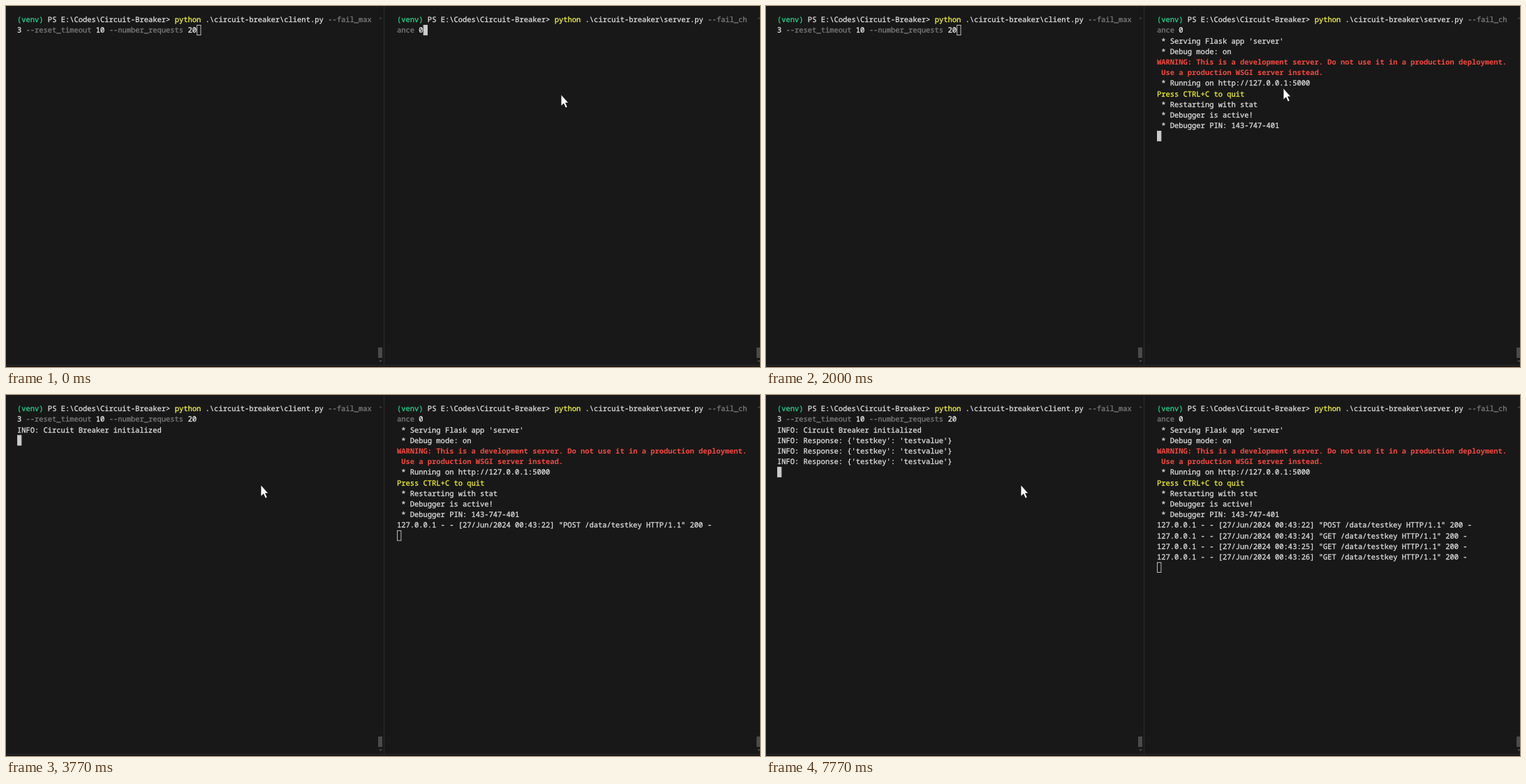
Write an HTML page that moves like this. It is 1080 px wide and 518 px high and loops after 8000 ms.

```html
<!DOCTYPE html>
<html lang="en">
<head>
<meta charset="utf-8">
<title>Circuit breaker terminals</title>
<style>
  html, body { margin: 0; width: 100%; height: 100%; overflow: hidden; background: #181818; }
  svg { display: block; width: 100vw; height: 100vh; }
  text {
    font: 10.45px "Noto Sans Mono", "DejaVu Sans Mono", monospace;
    font-variant-ligatures: none;
    text-rendering: geometricPrecision;
    white-space: pre;
    color: #dedede;
    fill: currentColor;
    stroke: currentColor;
    stroke-width: 0.3;
  }
  tspan { fill: currentColor; stroke: currentColor; }
  .env { color: #23d18b; }
  .cmd { color: #f5f543; font-weight: 500; }
  .opt { color: #7b7b7b; }
  .num { color: #eeeeee; font-weight: 500; }
  .warn { color: #f4483f; font-weight: 700; stroke: none; }
  .note { color: #f0f02c; }
  .edge { fill: #2b2b2b; }
  .thumb { fill: #4a4a4a; }
  .arrow { fill: #505050; }
</style>
</head>
<body>
<svg id="stage" viewBox="0 0 1080 518" preserveAspectRatio="none">
  <rect width="1080" height="518" fill="#181818"/>
  <rect class="edge" x="541" width="1" height="515"/>
  <rect class="edge" y="515" width="1080" height="1"/>
</svg>
<script>
const LOOP = 8000;
const CELL = 6.27, ROW = 15.2, TOP = 11.8, BASE = 11.3;
const LEFT = 16, RIGHT = 560;
const stage = document.getElementById('stage');

function add(tag, attrs, parent = stage) {
  const el = document.createElementNS('http://www.w3.org/2000/svg', tag);
  for (const key in attrs) el.setAttribute(key, attrs[key]);
  parent.appendChild(el);
  return el;
}

// Scroll bars
for (const x of [533, 1075]) {
  add('rect', { class: 'thumb', x, y: 490, width: 6, height: 15 });
  add('path', { class: 'arrow', d: `M${x + 1} 508.5h5l-2.5 2.5z` });
  add('path', { class: 'arrow', d: `M${x + 1} 18.5h5l-2.5-2.5z`, opacity: 0.7 });
}

// A line is a list of [text, class] runs set on the character grid.
const lines = [];
function line(x, row, from, ...runs) {
  const el = add('text', { y: TOP + row * ROW + BASE });
  let col = 0;
  for (const [str, cls = ''] of runs) {
    add('tspan', { x: x + col * CELL, class: cls }, el).textContent = str;
    col += str.length;
  }
  lines.push({ el, from });
}

function prompt(x, script, option) {
  line(x, 0, 0, ['(venv)', 'env'], [' PS E:\\Codes\\Circuit-Breaker> '],
    ['python', 'cmd'], [` .\\circuit-breaker\\${script} `], [option, 'opt']);
}

prompt(LEFT, 'client.py', '--fail_max');
line(LEFT, 1, 0, ['3', 'num'], [' --reset_timeout ', 'opt'], ['10', 'num'],
  [' --number_requests ', 'opt'], ['20', 'num']);
line(LEFT, 2, 3770, ['INFO: Circuit Breaker initialized']);

prompt(RIGHT, 'server.py', '--fail_ch');
line(RIGHT, 1, 0, ['ance ', 'opt'], ['0', 'num']);
[
  [" * Serving Flask app 'server'"],
  [' * Debug mode: on'],
  ['WARNING: This is a development server. Do not use it in a production deployment.', 'warn'],
  [' Use a production WSGI server instead.', 'warn'],
  [' * Running on http://127.0.0.1:5000'],
  ['Press CTRL+C to quit', 'note'],
  [' * Restarting with stat']
].forEach((run, i) => line(RIGHT, 2 + i, 1380, run));
line(RIGHT, 9, 1540, [' * Debugger is active!']);
line(RIGHT, 10, 1540, [' * Debugger PIN: 143-747-401']);

const log = (row, from, sec, verb) => line(RIGHT, row, from,
  [`127.0.0.1 - - [27/Jun/2024 00:43:${sec}] "${verb} /data/testkey HTTP/1.1" 200 -`]);
log(11, 3770, 22, 'POST');
for (let i = 0; i < 3; i++) {
  const from = 5770 + i * 1000;
  line(LEFT, 3 + i, from, ["INFO: Response: {'testkey': 'testvalue'}"]);
  log(12 + i, from, 24 + i, 'GET');
}

// Text cursors: [time, column, row]
const carets = [
  { x: LEFT, focus: t => t >= 2540, steps: [
    [0, 41, 1], [3310, 0, 2], [3770, 0, 3], [5770, 0, 4], [6770, 0, 5], [7770, 0, 6]] },
  { x: RIGHT, focus: t => t < 2540, steps: [
    [0, 6, 1], [1230, 0, 2], [1380, 0, 9], [1540, 0, 11],
    [3770, 0, 12], [5770, 0, 13], [6770, 0, 14], [7770, 0, 15]] }
];
for (const c of carets) {
  c.el = add('rect', { width: 5.4, height: 14.2, stroke: '#cccccc', 'stroke-width': 0.9 });
}

// Mouse pointer: [time, x, y] of the tip
const moves = [
  [0, 795, 127], [2000, 741, 118], [2080, 575, 95], [2150, 437, 90],
  [2230, 380, 104], [2310, 368, 122], [2380, 365, 129]
];
const pointer = add('path', {
  d: 'M0 0V16.6L3.8 13.1L6.6 19.3L9.2 18.1L6.5 12H10.8Z',
  fill: '#fff', stroke: '#111', 'stroke-width': 0.8
});

const current = (steps, t) => steps.filter(s => s[0] <= t).pop();

function draw(t) {
  for (const l of lines) l.el.style.display = t >= l.from ? '' : 'none';
  for (const c of carets) {
    const [, col, row] = current(c.steps, t);
    c.el.setAttribute('x', c.x + col * CELL + 0.5);
    c.el.setAttribute('y', TOP + row * ROW + 0.5);
    c.el.setAttribute('fill', c.focus(t) ? '#cccccc' : 'none');
  }
  const [, x, y] = current(moves, t);
  pointer.setAttribute('transform', `translate(${x} ${y})`);
}

const start = performance.now();
function tick() {
  draw((performance.now() - start) % LOOP);
  requestAnimationFrame(tick);
}
draw(0);
requestAnimationFrame(tick);
</script>
</body>
</html>
```
